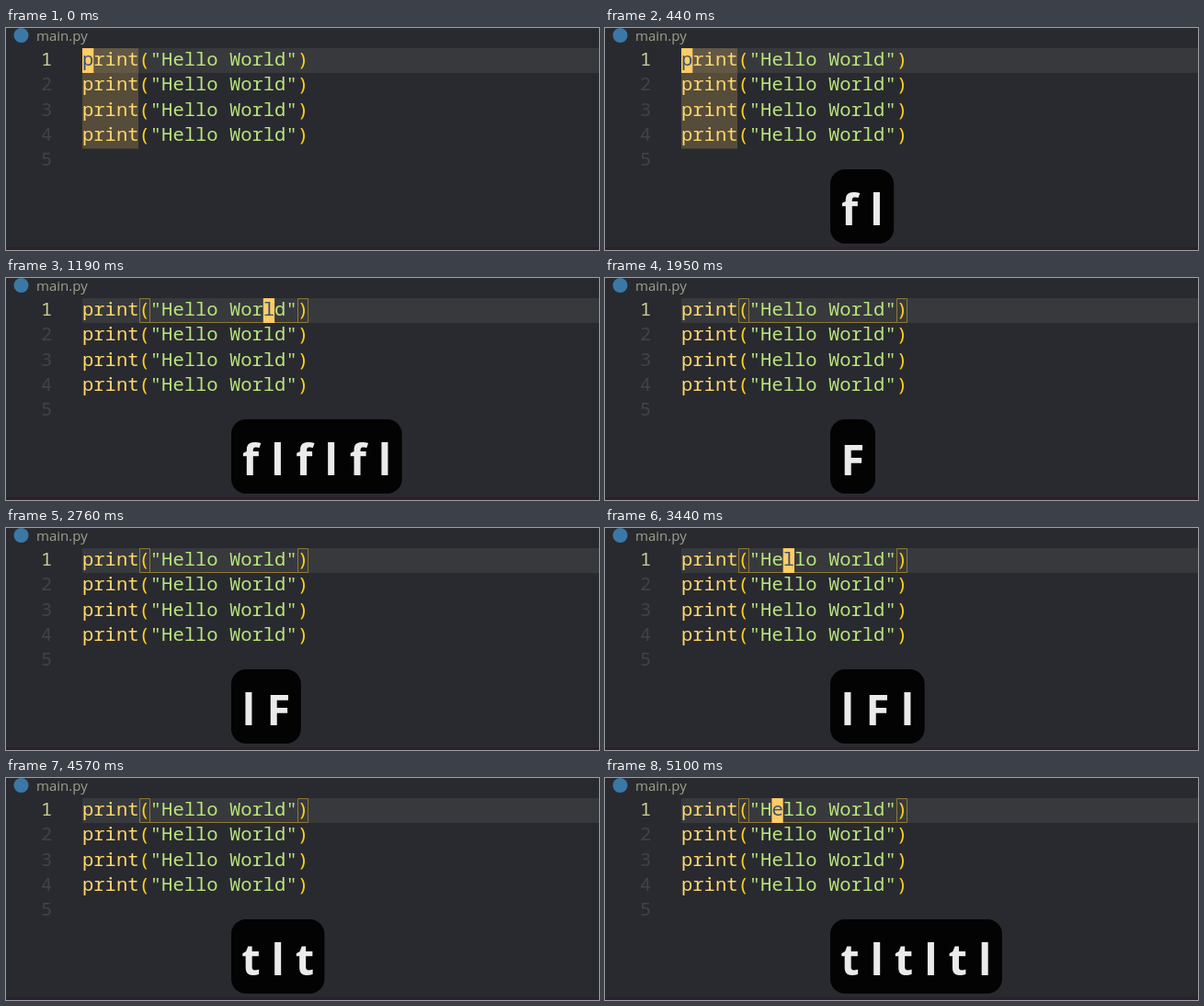
An HTML page for the animation above (5.67 s loop, 645x242 px).

```html
<!DOCTYPE html>
<html lang="en">
<head>
<meta charset="utf-8">
<title>Motions in an editor</title>
<style>
  html, body { margin: 0; width: 100%; height: 100%; overflow: hidden; background: #292a2f; }
  svg { display: block; width: 645px; height: 242px; }
  .code { font: 500 20.5px "Noto Sans Mono", "DejaVu Sans Mono", monospace; white-space: pre; }
  .tab { font: 15px "Open Sans", "Noto Sans", sans-serif; fill: #9aa38c; }
  .key { font: 700 47px "Open Sans", "Noto Sans", sans-serif; fill: #ebebeb; text-anchor: middle; }
  .call { fill: #ffd76d; }
  .paren { fill: #ffd21f; }
  .string { fill: #bae67e; }
  .number { fill: #404247; }
  .number.current { fill: #cbcc96; }
  .match { fill: none; stroke: #8f7a35; }
</style>
</head>
<body>
<svg viewBox="0 0 645 242">
  <rect width="645" height="242" fill="#292a2f"/>
  <rect x="83" y="22" width="562" height="27" fill="#38393c"/>
  <rect y="239" width="645" height="3" fill="#2d2129"/>
  <circle cx="16.5" cy="8" r="8" fill="#3b78a5"/>
  <text class="tab" x="33" y="14">main.py</text>

  <rect id="word" x="83" y="22" width="61" height="109.5" fill="#ffcc66" opacity=".21"/>
  <g id="lines" class="code"></g>
  <path id="match" class="match" d="M145.5 22.5h11v26h-11zM317.5 22.5h11v26h-11zM156 48.5h162"/>

  <g id="cursor" class="code">
    <rect y="22" width="12.3" height="27" fill="#ffcc66"/>
    <text id="letter" y="41" fill="#3a4f73"></text>
  </g>

  <g id="overlay">
    <rect id="panel" x="245" y="154" height="81" rx="16" fill="#030303"/>
    <g id="keys"></g>
  </g>

  <path id="mouse" d="M-4 -7h3l1 1l1 -1h3M0 -6v12M-4 7h3l1 -1l1 1h3" fill="none" stroke="#b5b3a8"/>
</svg>
<script>
const LOOP = 5670, LEFT = 83, PITCH = 12.3, LINE = 27.3, OFF = -1;
const CODE = 'print("Hello World")';
const $ = id => document.getElementById(id);

// [start time, column of the block cursor]
const cursorTrack = [
  [0, 0], [50, OFF], [260, 0], [470, 9], [670, OFF], [880, 10], [1060, OFF],
  [1190, 16], [1380, OFF], [1580, 16], [1790, OFF], [1970, 16], [2190, OFF],
  [2450, 10], [2650, OFF], [2840, 10], [3050, 9], [3230, OFF], [3440, 9],
  [3640, OFF], [4010, 0], [4240, OFF], [4290, 8], [4460, OFF], [4700, 8]
];

// [start time, pressed keys]
const keyTrack = [
  [0, ''], [340, 'f'], [420, 'fl'], [750, 'flf'], [850, 'flfl'], [1060, 'flflf'],
  [1140, 'flflfl'], [1950, 'F'], [2370, 'l'], [2760, 'lF'], [3020, 'lFl'], [3840, ''],
  [4240, 't'], [4260, 'tl'], [4570, 'tlt'], [4830, 'tltl'], [5030, 'tltlt'], [5100, 'tltltl']
];

const keyWidth = { f: 18.3, t: 18.7, l: 13.6, F: 25 };
const KEY_GAP = 13.2, PADDING = 12;

const at = (track, time) => track.findLast(([start]) => start <= time)[1];
const show = (id, visible) => $(id).setAttribute('visibility', visible ? 'visible' : 'hidden');

function drawLines() {
  let markup = '';
  for (let i = 0; i < 5; i++) {
    const y = 41 + i * LINE;
    markup += `<text class="number${i ? '' : ' current'}" x="38" y="${y}">${i + 1}</text>`;
    if (i < 4) markup += `<text x="${LEFT}" y="${y}"><tspan class="call">print</tspan>` +
      '<tspan class="paren">(</tspan><tspan class="string">"Hello World"</tspan>' +
      '<tspan class="paren">)</tspan></text>';
  }
  $('lines').innerHTML = markup;
}

let shownKeys = null;
function drawKeys(keys) {
  if (keys === shownKeys) return;
  shownKeys = keys;
  let x = 245 + PADDING;
  $('keys').innerHTML = [...keys].map(key => {
    const center = x + keyWidth[key] / 2;
    x += keyWidth[key] + KEY_GAP;
    return `<text class="key" x="${center}" y="215">${key}</text>`;
  }).join('');
  $('panel').setAttribute('width', Math.max(0, x - KEY_GAP + PADDING - 245));
  $('overlay').style.display = keys ? '' : 'none';
}

function drawCursor(column) {
  show('cursor', column !== OFF);
  if (column === OFF) return;
  $('cursor').setAttribute('transform', `translate(${LEFT + column * PITCH} 0)`);
  $('letter').textContent = CODE[column];
}

function drawMouse(time) {
  show('mouse', time >= 3680 && time < 4090);
  const step = Math.floor((time - 3680) / 45) * 45;
  const p = Math.min(1, Math.max(0, step / 270));
  const rest = (1 - p) ** 2;
  $('mouse').setAttribute('transform', `translate(${97.5 + 455 * rest} ${42.5 + 194 * rest})`);
}

function frame(now) {
  const time = now % LOOP;
  const onWord = time < 470 || (time >= 3960 && time < 4290);
  show('word', onWord);
  show('match', !onWord);
  drawCursor(at(cursorTrack, time));
  drawKeys(at(keyTrack, time));
  drawMouse(time);
}

drawLines();
const start = performance.now();
function tick() {
  frame(performance.now() - start);
  requestAnimationFrame(tick);
}
tick();
</script>
</body>
</html>
```
